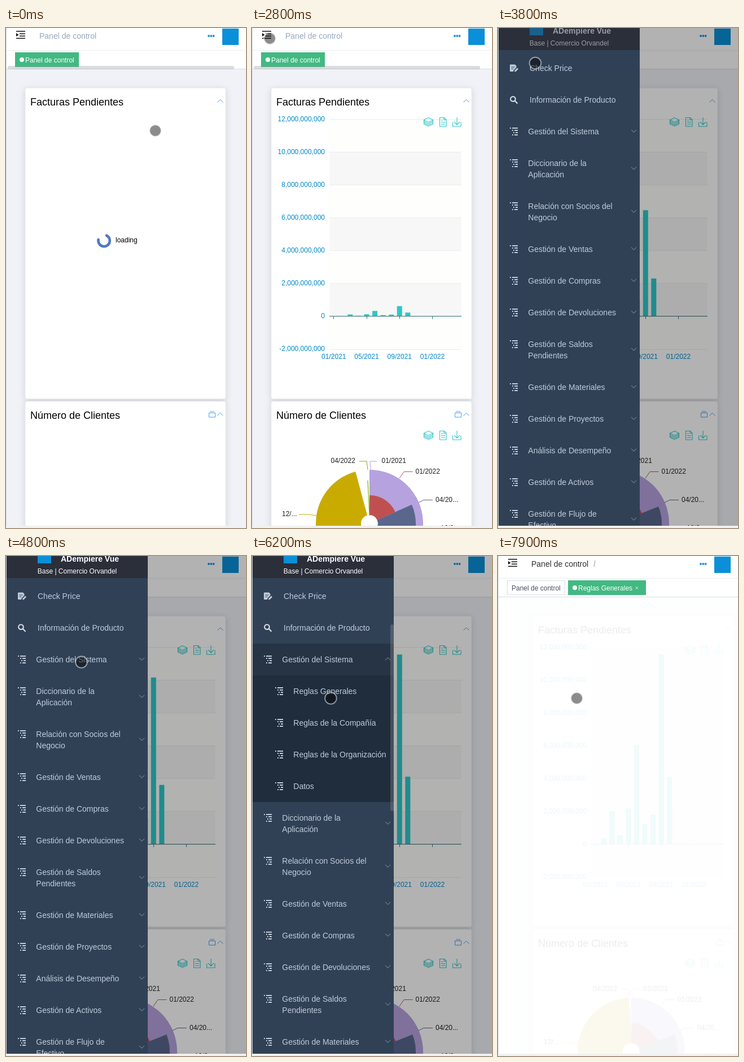
These frames come from a looping animation (425 px wide and 884 px high, 8 s). An HTML page:

```html
<!DOCTYPE html>
<html lang="es">
<head>
<meta charset="utf-8">
<title>Panel de control</title>
<style>
html, body { margin: 0; width: 100%; height: 100%; overflow: hidden; background: #fff; }
svg { display: block; width: 425px; height: 884px; font-family: "Liberation Sans", Arial, sans-serif; font-size: 14px; }
.title { font-size: 18px; }
.small { font-size: 12px; }
.axis { font-size: 12px; fill: #008acd; }
.line { fill: none; stroke-width: 1; }
.menu { fill: #bfcbd9; }
.menu .line { stroke: #909aa8; }
.tool { fill: none; stroke: #2ec7c9; stroke-width: 1.1; }
.card { fill: #fff; stroke: #e6ebf5; filter: drop-shadow(0 2px 6px rgba(0, 0, 0, .13)); }
</style>
</head>
<body>
<svg viewBox="0 0 425 884" xmlns="http://www.w3.org/2000/svg">
  <defs>
    <g id="tree">
      <path d="M0-7h2v2h-2zM4-7h10v2H4zM4-3h2v2H4zM8-3h6v2H8zM6 1h2v2H6zM10 1h4v2h-4zM4 5h2v2H4zM8 5h6v2H8z"/>
    </g>
    <g id="tools" class="tool">
      <path d="M304.500 162.500l8-4 8 4-8 4zM304.500 165l8 4 8-4M304.500 167.500l8 4 8-4M304.500 170l8 3.500 8-3.500M304.500 162.500v7.500M320.500 162.500v7.500"/>
      <path d="M332.500 158.500h8l3.500 3.500v12h-11.500zM340 158.500v4h4M335 163h3M335 166.500h7M335 170h7"/>
      <path d="M355.500 166.500v7.500h14.500v-7.500M363 158v12.500M358 166l5 5 5-5"/>
    </g>
    <clipPath id="subClip"><rect id="subBox" x="1" y="211" width="250" height="0"/></clipPath>
    <clipPath id="sideClip"><rect x="1" width="250" height="880"/></clipPath>
  </defs>

  <rect width="425" height="884" fill="#fff"/>

  <g id="page">
    <rect x="1" y="73" width="424" height="811" fill="#f0f2f7"/>
    <rect class="card" x="34" y="106" width="355" height="550" rx="3"/>
    <rect class="card" x="34" y="660" width="355" height="550" rx="3"/>
    <text class="title" x="43" y="137">Facturas Pendientes</text>
    <text class="title" x="43" y="691">Número de Clientes</text>
    <g class="line" stroke="#409eff">
      <path d="M374.500 131.500l5-5 5 5M374.500 685.500l5-5 5 5M359.500 680.500h11v7.500h-11zM361 678h8"/>
    </g>
    <g id="spinner">
      <path d="M178 366.800a10.200 10.200 0 1 1-14.400 7.200" fill="none" stroke="#5079c0" stroke-width="4.600" stroke-linecap="round"/>
      <text class="small" x="194" y="379">loading</text>
    </g>
    <g id="charts">
      <g id="grid"></g>
      <g id="bars" fill="#2ec7c9"></g>
      <g id="axis"></g>
      <use href="#tools"/>
      <use href="#tools" y="554"/>
      <g id="pie"></g>
      <g id="labels" class="small"></g>
    </g>
  </g>

  <rect x="1" width="424" height="73" fill="#fff"/>
  <path d="M1 39.500h424" stroke="#f0f1f3" stroke-width="1.500"/>
  <path d="M1 72.500h424" stroke="#d8dce5"/>
  <path d="M18 5h16v1.600H18zM24 9.500h10v1.600H24zM24 13.500h10v1.600H24zM18 17.500h16v1.600H18zM18 9l4.500 3-4.500 3z" fill="#111"/>
  <text id="crumb" x="59" y="19">Panel de control</text>
  <text id="slash" x="169" y="19" font-weight="bold" fill="#b4bac4">/</text>
  <g fill="#1890e8"><circle cx="359" cy="14" r="1.900"/><circle cx="363.300" cy="14" r="1.900"/><circle cx="367.600" cy="14" r="1.900"/></g>
  <rect x="383" y="1" width="29" height="29" fill="#0a8fd8"/>
  <g id="tagOne">
    <rect x="16" y="43" width="113" height="26" fill="#42b983"/>
    <circle cx="28" cy="56" r="4" fill="#fff"/>
    <text class="small" x="34" y="61" fill="#fff">Panel de control</text>
    <rect id="tagScroll" x="3" y="67" width="401" height="6" rx="3" fill="#909399" fill-opacity=".32"/>
  </g>
  <g id="tagTwo">
    <rect x="16.500" y="43.500" width="102" height="25" fill="#fff" stroke="#d8dce5"/>
    <text class="small" x="24" y="61" fill="#495060">Panel de control</text>
    <rect x="124" y="43" width="138" height="26" fill="#42b983"/>
    <circle cx="136" cy="56" r="4" fill="#fff"/>
    <text class="small" x="142" y="61" fill="#fff">Reglas Generales</text>
    <path d="M244 54.500l4 4m0-4l-4 4" stroke="#fff" stroke-width=".9"/>
  </g>

  <rect id="shade" x="1" width="424" height="880" fill="#000" fill-opacity=".3"/>
  <g clip-path="url(#sideClip)">
    <g id="side">
      <rect x="1" width="250" height="884" fill="#304156"/>
      <g class="menu">
        <path d="M22 64.500h8l2.500 2.500v2.500l-5 5.500-.5 2h-5q-1 0-1-1V65.500q0-1 1-1z"/>
        <path d="M23.500 69h6M23.500 72h4" stroke="#304156"/>
        <path d="M29 77.500l.6-2.600 4.400-4.400 2 2-4.400 4.400z"/>
        <text x="56" y="76">Check Price</text>
        <g fill="none" stroke="#dfe6ee" stroke-width="2"><circle cx="26.500" cy="125.500" r="4.300"/><path d="M29.800 128.800l4.700 4.700"/></g>
        <text x="56" y="132">Información de Producto</text>
        <rect id="hover" x="1" y="155" width="250" height="56" fill="#263445"/>
        <g id="top"></g>
        <g id="rest"></g>
        <g clip-path="url(#subClip)">
          <rect x="1" y="211" width="250" height="224" fill="#1f2d3d"/>
          <g id="sub"></g>
        </g>
      </g>
      <rect id="thumb" x="245" y="121" width="6" height="330" rx="3" fill="#909399" fill-opacity=".35"/>
      <rect x="1" width="250" height="39" fill="#2b2f3a"/>
      <g id="brand" fill="#fff">
        <rect x="56" y="-11" width="24" height="24" fill="#0a8fd8"/>
        <text x="97" y="10" font-weight="bold">ADempiere Vue</text>
        <text class="small" x="126" y="31" text-anchor="middle">Base | Comercio Orvandel</text>
      </g>
    </g>
  </g>
  <rect y="880" width="425" height="4" fill="#f1f1f1"/>
  <path d="M.5 0v880" stroke="#d9dadd"/>
  <circle id="cursor" fill="#000" fill-opacity=".45" stroke="#fff" stroke-opacity=".5" stroke-width="2"/>
</svg>
<script>
const LOOP = 8000, STEP = 100, ZERO = 509.5, UNIT = 58.07, SLOT = 14.56, FIRST = 144.8;
const heights = [10, 58.5, 16, 63.5, 175.5, 35.5, 52.5, 336, 119.5];
const $ = id => document.getElementById(id);
const clamp = v => Math.max(0, Math.min(1, v));
const part = (t, start, length) => clamp((t - start) / length);
const easeOut = p => 1 - Math.pow(1 - p, 2.5);
const inOut = p => p < .5 ? 4 * p ** 3 : 1 - 4 * (1 - p) ** 3;
const show = (id, on) => { $(id).style.display = on ? '' : 'none'; };

// Bar chart frame
let grid = '', axis = '';
for (let v = 12; v >= -2; v -= 2) {
  const y = ZERO - v / 2 * UNIT;
  if (v > -2) grid += `<rect x="137.5" y="${y}" width="233" height="${UNIT}" fill="${v / 2 % 2 ? '#f7f7f7' : '#fefefc'}"/>`;
  grid += `<path d="M137.5 ${Math.round(y) + .5}h233" stroke="#ececec"/>`;
  axis += `<text class="axis" x="129" y="${y + 3.5}" text-anchor="end">${(v * 1e9).toLocaleString('en-US')}</text>`;
}
axis += `<path d="M137 ${ZERO}h234" stroke="#3b7d80"/>`;
['01/2021', '05/2021', '09/2021', '01/2022'].forEach((s, i) => {
  const x = FIRST + i * 4 * SLOT;
  axis += `<path d="M${Math.floor(x) + .5} ${ZERO}v5" stroke="#33707c"/>
    <text class="axis" x="${x}" y="585" text-anchor="middle">${s}</text>`;
});
$('grid').innerHTML = grid;
$('axis').innerHTML = axis;
$('bars').innerHTML = heights.map((h, i) => `<rect x="${FIRST + (i + 1) * SLOT - 4.5}" width="9"/>`).join('');
const bars = [...$('bars').children];

// Rose chart: colour, radius, start and end in degrees
const wedges = [
  ['#b6a2de', 95, 0, 181], ['#c9ab00', 95, 181, 357.5],
  ['#c05050', 50, 0, 68.5], ['#59678c', 82, 68.5, 175]
];
const wedge = (r, a, b) => {
  const at = (q, d) => {
    const s = d * Math.PI / 180;
    return `${208 + q * Math.sin(s)} ${876 - q * Math.cos(s)}`;
  };
  const big = b - a > 180 ? 1 : 0;
  return `M${at(15, a)}L${at(r, a)}A${r} ${r} 0 ${big} 1 ${at(r, b)}L${at(15, b)}A15 15 0 ${big} 0 ${at(15, a)}`;
};
$('pie').innerHTML = wedges.map(w => `<path fill="${w[0]}"/>`).join('') +
  '<path d="M208 862L205 800" stroke="#7eb00a" stroke-width="1.2"/>';
const slices = [...$('pie').children];
const tags = [
  ['04/2022', 139.5, 769, '#7eb00a', 'M205 781L203 766H190'],
  ['01/2021', 229.5, 769, '#b6a2de', 'M210 781L209 766H221'],
  ['01/2022', 289.5, 788, '#c05050', 'M261 796L269 784.5H284.500'],
  ['04/20...', 325, 838, '#59678c', 'M295 839L304 834.5H320'],
  ['12/2...', 334, 888, '#59678c', 'M303 884H328'],
  ['12/...', 53, 863, '#c9ab00', 'M114 862L99 860H83']
];
$('labels').innerHTML = tags.map(([s, x, y, c, d]) =>
  `<path class="line" d="${d}" stroke="${c}" pathLength="1"/><text x="${x}" y="${y}" fill="#222">${s}</text>`).join('');
const leads = [...$('labels').querySelectorAll('path')];
const names = [...$('labels').querySelectorAll('text')];

// Menu rows
const row = (lines, y, x = 21) => `<use href="#tree" x="${x}" y="${y + 28}"/>` +
  lines.map((s, i) => `<text x="${x + 32.3}" y="${y + 33 + i * 20}">${s}</text>`).join('');
const arrow = (y, dir, id = '') => `<path ${id} class="line" d="M236 ${y - dir * 2.2}l4.500 ${dir * 4.5} 4.500 ${-dir * 4.5}"/>`;
$('top').innerHTML = row(['Gestión del Sistema'], 155) + arrow(182, 1, 'id="down"') + arrow(182, -1, 'id="up"');
let y = 211, rest = '';
for (const item of ['Diccionario de la/Aplicación', 'Relación con Socios del/Negocio', 'Gestión de Ventas',
  'Gestión de Compras', 'Gestión de Devoluciones', 'Gestión de Saldos/Pendientes', 'Gestión de Materiales',
  'Gestión de Proyectos', 'Análisis de Desempeño', 'Gestión de Activos', 'Gestión de Flujo de/Efectivo']) {
  const lines = item.split('/'), h = 36 + lines.length * 20;
  rest += row(lines, y) + arrow(y + h / 2 - 1, 1);
  y += h;
}
$('rest').innerHTML = rest;
$('sub').innerHTML = ['Reglas Generales', 'Reglas de la Compañía', 'Reglas de la Organización', 'Datos']
  .map((s, i) => row([s], 211 + i * 56, 41)).join('');

// Pointer stops: time, x, y
const stops = [
  [0, 264.5, 181.5], [400, 264.5, 181.5], [1200, 70, 28], [1600, 32.5, 25.5], [2100, 31.5, 18.5],
  [2900, 31.5, 18.5], [3100, 37.5, 12.5], [3400, 38, 14], [3800, 66, 62], [4700, 133.5, 187.5],
  [5500, 133.5, 187.5], [5600, 136.5, 214], [5900, 136.5, 214], [6100, 139.5, 251.5], [LOOP, 139.5, 251.5]
];
const presses = [2700, 4700, 7400];
const holds = [[2100, 3000], [5400, 5600], [5600, 6000]];

function pointer(t) {
  const i = stops.findIndex(s => s[0] > t);
  const a = stops[i - 1], b = stops[i], p = part(t, a[0], b[0] - a[0]);
  $('cursor').setAttribute('cx', a[1] + (b[1] - a[1]) * p);
  $('cursor').setAttribute('cy', a[2] + (b[2] - a[2]) * p);
  $('cursor').setAttribute('r', presses.includes(t) ? 14 : 10.3);
}

function drawCharts(t) {
  const hold = holds.find(h => t >= h[0] && t < h[1]);
  if (hold) t = hold[0];
  show('spinner', t < 700);
  show('charts', t >= 700);
  const grow = inOut(part(t, 680, 6000));
  bars.forEach((bar, i) => {
    bar.setAttribute('y', ZERO - heights[i] * grow);
    bar.setAttribute('height', heights[i] * grow);
  });
  const turn = inOut(part(t, 690, 1777));
  wedges.forEach(([, r, a, b], i) => slices[i].setAttribute('d', wedge(r, a * turn, b * turn)));
  names.forEach(n => n.setAttribute('opacity', part(t, 1040, 1060)));
  leads.forEach((lead, i) => {
    const p = i === 5 ? part(t, 1100, 1000) : part(t, 1600, 500);
    lead.setAttribute('stroke-dasharray', `${p} 2`);
    lead.setAttribute('opacity', p ? 1 : 0);
  });
}

function drawMenu(t) {
  const shut = easeOut(part(t, 7570, 280));
  const x = t < 3000 ? -250 : t < 3100 ? -125 : -250 * shut;
  $('side').setAttribute('transform', `translate(${x})`);
  show('side', x > -250);
  show('shade', t >= 3000 && t < 7570);
  $('brand').setAttribute('opacity', .04 + .96 * inOut(part(t, 3000, 1600)));
  const h = 224 * easeOut(part(t, 4820, 400));
  $('subBox').setAttribute('height', h);
  $('rest').setAttribute('transform', `translate(0 ${h})`);
  show('hover', t >= 4900);
  show('up', t >= 4900);
  show('down', t < 4900);
  $('thumb').setAttribute('opacity', part(t, 4800, 300));
}

function draw(time) {
  // The screen refreshes ten times a second
  const t = Math.floor(time % LOOP / STEP) * STEP;
  const left = t >= 7570, leave = easeOut(part(t, 7570, 500));
  drawCharts(t);
  drawMenu(t);
  pointer(t);
  $('page').setAttribute('opacity', 1 - leave);
  $('page').setAttribute('transform', `translate(${30 * leave})`);
  $('crumb').setAttribute('fill', left ? '#303133' : '#97a8be');
  show('slash', left);
  show('tagTwo', left);
  show('tagOne', !left);
  show('tagScroll', t < 3000);
}

const start = performance.now();
function tick() {
  draw(performance.now() - start);
  requestAnimationFrame(tick);
}
tick();
</script>
</body>
</html>
```
